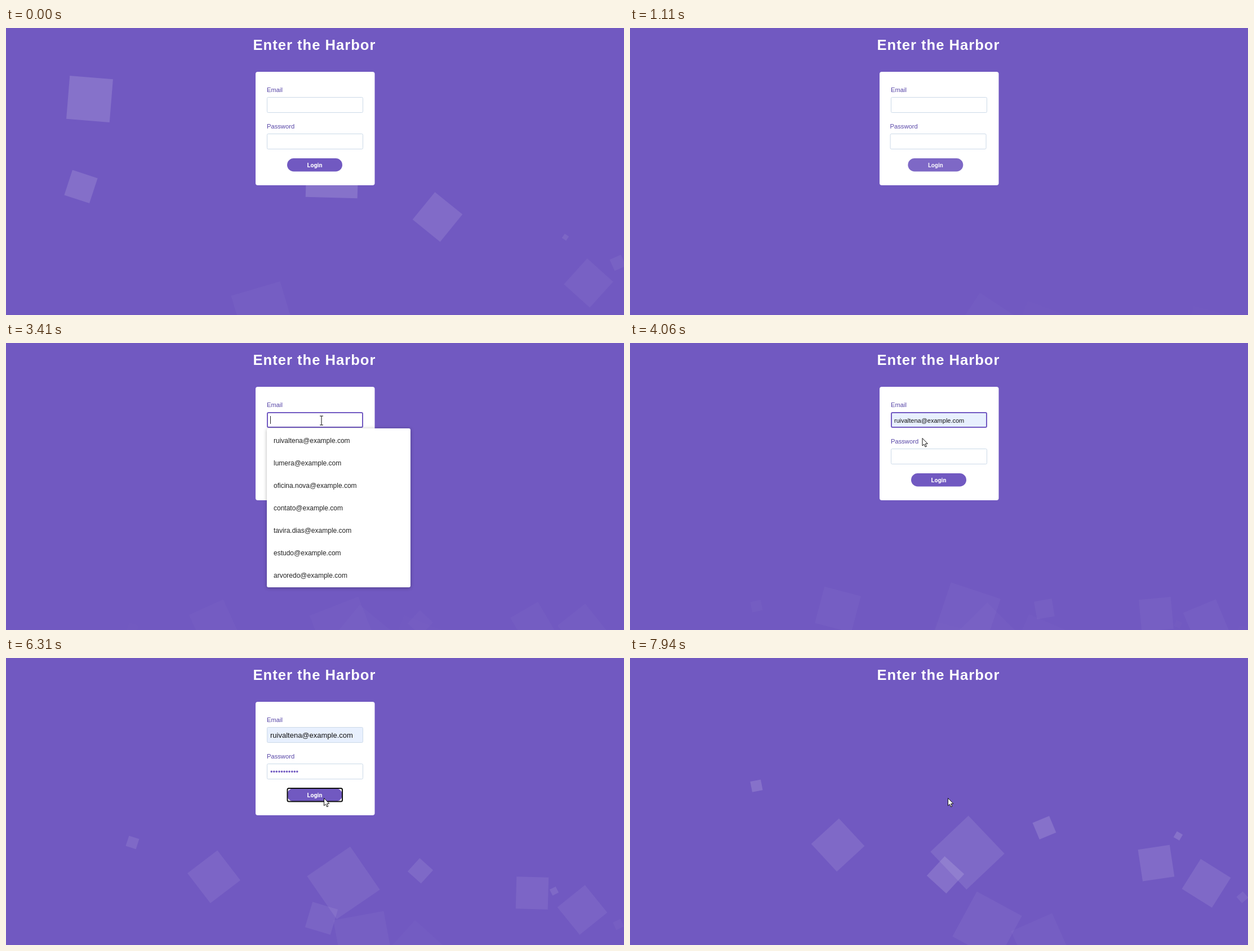
Write an HTML page with a canvas that moves like this. It is 1097x511 px and loops after 7970 ms.

```html
<!DOCTYPE html>
<html lang="en">
<head>
<meta charset="utf-8">
<title>Login</title>
<style>
html, body { margin: 0; width: 100%; height: 100%; overflow: hidden; background: #7159c1; }
canvas { display: block; }
</style>
</head>
<body>
<canvas id="stage" width="1097" height="511"></canvas>
<script>
const ctx = document.getElementById('stage').getContext('2d');
const W = 1097, H = 511, LOOP = 7970;
const PURPLE = '#7159c1';
const SANS = '"Liberation Sans", Arial, sans-serif';

// Key moments in ms
const RELOAD = 683, OPEN = 2440, PREVIEW = 3750, CHOOSE = 4040, FILL = 4150,
  PASSWORD = 4280, PRESS = 6290, HIDE = 6320;

const suggestions = ['ruivaltena', 'lumera', 'oficina.nova', 'contato', 'tavira.dias', 'estudo', 'arvoredo']
  .map(name => name + '@example.com');
const EMAIL = suggestions[0];

// Each square rises from below the stage and turns in step with its rise.
// Before the reload: x, size, rise at 0 ms
const oldSquares = [
  [148.5, 77, 423], [133, 47, 252], [579, 92, 301], [766, 63, 206],
  [993, 9, 143], [1034, 62, 88], [1086, 22, 104], [456, 91, 49]
].map(([x, size, rise]) => ({ x, size, rise, speed: rise / 5, accel: 0, time: 0 }));

// After the reload: x, size, rise and speed (px/s) at the time of the click
const newSquares = [
  [224.5, 19, 192, 62], [369, 67, 155, 36], [599, 93, 157, 35], [735.5, 32, 148, 45],
  [934, 57, 121, 31], [973, 12, 102, 51], [1023, 63, 94, 26], [1087, 15, 44, 24],
  [560, 47, 71, 39], [634, 91, 53, 13.5], [729, 80, 28, 8]
].map(([x, size, rise, speed]) => (
  { x, size, rise, speed, accel: .17 * (speed - .0017 * rise * rise), time: 6310 }));

// Pointer moves: begin, end, x, y, sag of the path
const moves = [
  [1620, 2380, 560, 138, 56], [3620, 3900, 519, 169, 0],
  [4070, 4270, 548, 200, 0], [5700, 6230, 564.5, 249, 0]
];

const clamp = v => Math.min(1, Math.max(0, v));

function bezier(x1, y1, x2, y2) {
  const at = (a, b, s) => 3 * (1 - s) * (1 - s) * s * a + 3 * (1 - s) * s * s * b + s * s * s;
  return x => {
    x = clamp(x);
    let lo = 0, hi = 1;
    for (let i = 0; i < 24; i++) {
      const mid = (lo + hi) / 2;
      if (at(x1, x2, mid) < x) lo = mid; else hi = mid;
    }
    return at(y1, y2, (lo + hi) / 2);
  };
}
const ease = bezier(.25, .1, .25, 1);
const easeOutCirc = bezier(.075, .82, .165, 1);

function box(x, y, w, h, r, fill, stroke, line = 1) {
  ctx.beginPath();
  ctx.roundRect(x, y, w, h, r);
  if (fill) { ctx.fillStyle = fill; ctx.fill(); }
  if (stroke) { ctx.strokeStyle = stroke; ctx.lineWidth = line; ctx.stroke(); }
}

function text(str, x, y, font, color, align = 'left') {
  ctx.font = font;
  ctx.fillStyle = color;
  ctx.textAlign = align;
  ctx.fillText(str, x, y);
}

function drawSquare({ x, size, rise, speed, accel, time }, t) {
  let u = (t - time) / 1000;
  if (accel > 0) u = Math.max(u, -speed / (2 * accel));
  const up = rise + speed * u + accel * u * u;
  if (up <= 0) return;
  const alpha = .15 * clamp(up * (1 + .15 * accel) / 280);
  ctx.save();
  ctx.translate(x, H + size / 2 - up);
  ctx.rotate(1.5 * up * Math.PI / 180);
  ctx.fillStyle = `rgba(255,255,255,${alpha})`;
  ctx.fillRect(-size / 2, -size / 2, size, size);
  ctx.restore();
}

function field(label, y, focused, filled) {
  text(label, 463, y - 9.5, '11.2px ' + SANS, '#5644a6');
  const fill = filled ? '#e8f0fe' : '#fff';
  if (focused) box(464, y + 1, 169, 26, 2, fill, PURPLE, 2);
  else box(463.5, y + .5, 170, 27, 2, fill, '#cbd9e8');
}

function caret(x, y) {
  ctx.fillStyle = '#222';
  ctx.fillRect(x, y, 1, 14);
}

function emailBlock(t) {
  const focused = t >= OPEN && t < PASSWORD, filled = t >= PREVIEW;
  field('Email', 123, focused, filled);
  if (filled) text(EMAIL, 469, 141.5, (t < FILL ? 11 : 13) + 'px ' + SANS, '#111');
  else if (focused && (t < 2920 || t >= 3410)) caret(469, 130);
}

function passwordBlock(t) {
  const focused = t >= PASSWORD && t < PRESS;
  field('Password', 188, focused, false);
  let n = 0;
  if (t >= 4850) n = 1;
  if (t >= 4990) n = Math.min(11, 2 + Math.floor((t - 4990) / 78));
  text('•'.repeat(n), 469, 206.5, '13px ' + SANS, PURPLE);
  if (focused && (t < 4780 || (t >= 4850 && t < 6190))) caret(469 + n * 4.55, 195);
}

function buttonBlock(t) {
  box(499, 232, 98, 23.5, 11.75, PURPLE);
  if (t >= PRESS) box(499.5, 232, 97.5, 23.5, 2.5, null, '#101010', 2);
  text('Login', 548, 247.5, 'bold 10.7px Roboto, sans-serif', '#fff', 'center');
}

function drawForm(t) {
  const fresh = t >= RELOAD;
  const show = fresh ? ease((t - RELOAD) / 300) : 1;
  const scale = .9 + .1 * show;
  const drop = t < HIDE ? 0 : H * easeOutCirc((t - HIDE) / 1000);
  ctx.save();
  ctx.translate(548.5, 179 + drop);
  ctx.scale(scale, scale);
  ctx.translate(-548.5, -179);
  ctx.globalAlpha = show;
  box(443, 78, 211.5, 202, 4, '#fff');
  ctx.clip();
  [emailBlock, passwordBlock, buttonBlock].forEach((block, i) => {
    const p = fresh ? ease((t - RELOAD - i * 75) / 440) : 1;
    ctx.save();
    ctx.globalAlpha = show * p;
    ctx.translate(-60 * (1 - p), 0);
    block(t);
    ctx.restore();
  });
  ctx.restore();
}

function drawSuggestions(t) {
  if (t < OPEN || t >= CHOOSE) return;
  ctx.save();
  ctx.shadowColor = 'rgba(0,0,0,.3)';
  ctx.shadowBlur = 6;
  ctx.shadowOffsetY = 1;
  box(463, 152, 255, 283, 3, '#fff');
  ctx.restore();
  if (t >= PREVIEW) {
    ctx.fillStyle = '#e8e8e9';
    ctx.fillRect(463, 154, 255, 39);
  }
  suggestions.forEach((s, i) => text(s, 475, 178 + i * 40, '12px ' + SANS, '#222'));
}

function pointerAt(t) {
  let x = 968, y = 0;
  for (const [begin, end, toX, toY, sag] of moves) {
    const p = 1 - Math.pow(1 - clamp((t - begin) / (end - begin)), 1.4);
    x += (toX - x) * p;
    y += (toY - y) * p + sag * Math.sin(Math.PI * p);
  }
  return [x, y];
}

function drawPointer(t) {
  if (t < moves[0][0]) return;
  const [x, y] = pointerAt(t);
  const inField = x > 463 && x < 634 && ((y > 123 && y < 151) || (y > 188 && y < 216));
  ctx.save();
  ctx.translate(x, y);
  ctx.strokeStyle = '#111';
  ctx.lineWidth = 1;
  ctx.beginPath();
  if (inField) {
    for (const s of [-1, 1]) { ctx.moveTo(-3, 8 * s); ctx.lineTo(3, 8 * s); }
    ctx.moveTo(0, -8);
    ctx.lineTo(0, 8);
  } else {
    const arrow = [[0, 0], [0, 13.5], [3, 10.7], [5.2, 15.5], [7.3, 14.6], [5.2, 10], [9.3, 9.8]];
    for (const [px, py] of arrow) ctx.lineTo(px, py + .5);
    ctx.closePath();
    ctx.fillStyle = '#fff';
    ctx.fill();
  }
  ctx.stroke();
  ctx.restore();
}

function draw(t) {
  ctx.fillStyle = PURPLE;
  ctx.fillRect(0, 0, W, H);
  for (const s of t < RELOAD ? oldSquares : newSquares) drawSquare(s, t);
  ctx.letterSpacing = '1px';
  text('Enter the Harbor', 438.5, 39, 'bold 25.6px ' + SANS, '#fff');
  ctx.letterSpacing = '0px';
  drawForm(t);
  drawSuggestions(t);
  drawPointer(t);
}

const start = performance.now();
function tick() {
  draw((performance.now() - start) % LOOP);
  requestAnimationFrame(tick);
}
tick();
</script>
</body>
</html>
```
